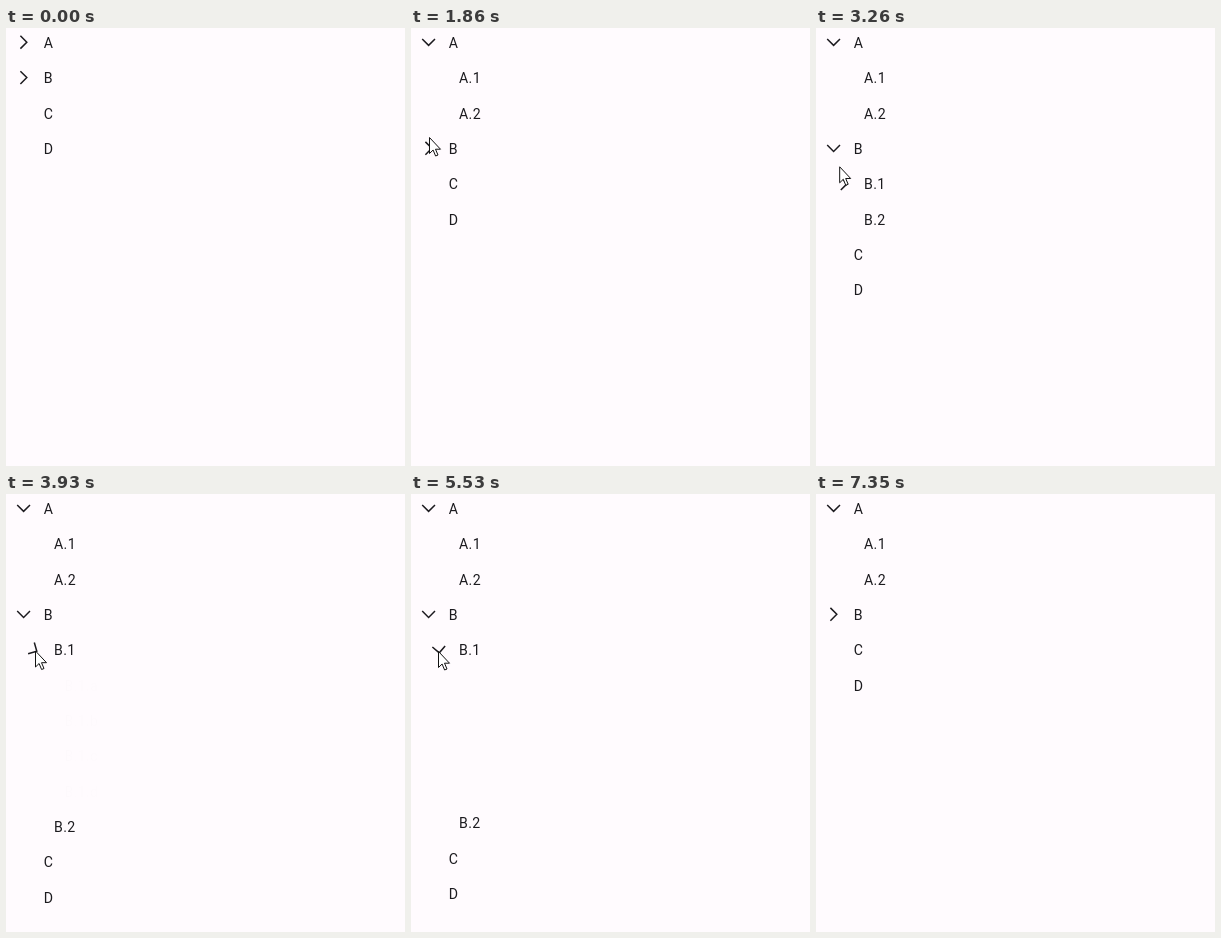
Animation of 399x438 px, one loop 7.75 s. Source, as an HTML page with a canvas:

```html
<!DOCTYPE html>
<html lang="en">
<head>
<meta charset="utf-8">
<title>Tree view</title>
<style>
  html, body { margin: 0; height: 100%; overflow: hidden; background: #fffbfe; }
  canvas { display: block; width: 399px; height: 438px; }
</style>
</head>
<body>
<canvas></canvas>
<script>
const LOOP = 7750, WIDTH = 399, HEIGHT = 438;
const ROW = 35.36, INDENT = 10.4;
const MOVE = 200, FADE = 120, TURN = 250, TURN_DELAY = 105, PRESS = 140;

const canvas = document.querySelector('canvas');
const ctx = canvas.getContext('2d');
const scale = window.devicePixelRatio || 1;
canvas.width = WIDTH * scale;
canvas.height = HEIGHT * scale;

const leaf = name => ({ name });
const branch = (name, opens, closes, children) => ({ name, opens, closes, children });

const b1 = branch('B.1', 3730, 5390, [...'abcd'].map(c => leaf('B.1.' + c)));
const a = branch('A', 1200, Infinity, [leaf('A.1'), leaf('A.2')]);
const b = branch('B', 2800, 6480, [b1, leaf('B.2')]);
const tree = [a, b, leaf('C'), leaf('D')];
const clicks = [a, b, b1].flatMap(node => [node.opens, node.closes]);

// The pointer glides from stop to stop, slowing down as it arrives.
const entry = { x: 293, y: 416 };
const stops = [
  { from: 380, to: 850, x: 14, y: 29 },
  { from: 990, to: 1060, x: 14, y: 12 },
  { from: 1690, to: 1860, x: 18, y: 109 },
  { from: 1860, to: 2600, x: 17, y: 119 },
  { from: 3170, to: 3470, x: 29, y: 156.5 },
  { from: 4130, to: 4620, x: 137, y: 287.5 },
  { from: 4690, to: 5260, x: 27, y: 157 },
  { from: 5860, to: 6140, x: 26, y: 120 },
  { from: 6250, to: 6340, x: 19, y: 119 },
  { from: 6580, to: 7350, x: 350, y: 440 }
];

const ramp = (t, start, length) => Math.min(1, Math.max(0, (t - start) / length));
const easeInOut = p => (1 - Math.cos(p * Math.PI)) / 2;
const easeOut = p => 1 - (1 - p) ** 2;

// Opening makes room, then fades in; closing fades out, then closes the gap.
function openness({ opens, closes }, t) {
  const turn = start => easeInOut(ramp(t, start + TURN_DELAY, TURN));
  return {
    room: easeInOut(ramp(t, opens, MOVE)) - easeInOut(ramp(t, closes + FADE, MOVE)),
    alpha: ramp(t, opens + MOVE, FADE) - ramp(t, closes, FADE),
    turn: turn(opens) - turn(closes)
  };
}

function drawChevron(x, y, turn) {
  ctx.save();
  ctx.translate(x, y);
  ctx.rotate(turn * Math.PI / 2);
  ctx.beginPath();
  ctx.moveTo(-3.2, -6.4);
  ctx.lineTo(3.2, 0);
  ctx.lineTo(-3.2, 6.4);
  ctx.stroke();
  ctx.restore();
}

// Draws the nodes and returns how many rows they take.
function drawNodes(nodes, t, row = 0, depth = 0, alpha = 1) {
  const first = row;
  for (const node of nodes) {
    const y = 14.5 + row * ROW;
    ctx.globalAlpha = alpha;
    ctx.fillText(node.name, 37.7 + depth * INDENT, y + 5.3);
    row++;
    if (!node.children) continue;
    const state = openness(node, t);
    drawChevron(17.6 + depth * INDENT, y - 0.3, state.turn);
    row += state.room * drawNodes(node.children, t, row, depth + 1, alpha * state.alpha);
  }
  return row - first;
}

function pointerAt(t) {
  let { x, y } = entry;
  for (const stop of stops) {
    const p = easeOut(ramp(t, stop.from, stop.to - stop.from));
    x += (stop.x - x) * p;
    y += (stop.y - y) * p;
  }
  return [x, y];
}

const arrow = new Path2D('M.5 .5V16.5L4.1 13 6.6 19 9 18 6.5 12.2H11.5Z');

function drawPointer(t) {
  if (t < stops[0].from || t >= stops.at(-1).to) return;
  ctx.save();
  ctx.translate(...pointerAt(t));
  if (clicks.some(click => t >= click - PRESS && t < click)) {
    ctx.fillStyle = 'rgba(255, 255, 0, .55)';
    ctx.beginPath();
    ctx.arc(0, 0, 12, 0, Math.PI * 2);
    ctx.fill();
  }
  ctx.fillStyle = '#fff';
  ctx.strokeStyle = '#111';
  ctx.lineWidth = 1;
  ctx.fill(arrow);
  ctx.stroke(arrow);
  ctx.restore();
}

function draw(t) {
  ctx.setTransform(scale, 0, 0, scale, 0, 0);
  ctx.globalAlpha = 1;
  ctx.fillStyle = '#fffbfe';
  ctx.fillRect(0, 0, WIDTH, HEIGHT);
  ctx.fillStyle = ctx.strokeStyle = '#1c1b1f';
  ctx.lineWidth = 1.5;
  ctx.font = '14.14px Roboto, sans-serif';
  ctx.letterSpacing = '0.3px';
  drawNodes(tree, t);
  ctx.globalAlpha = 1;
  drawPointer(t);
}

const start = performance.now();
function tick() {
  draw((performance.now() - start) % LOOP);
  requestAnimationFrame(tick);
}
tick();
</script>
</body>
</html>
```
